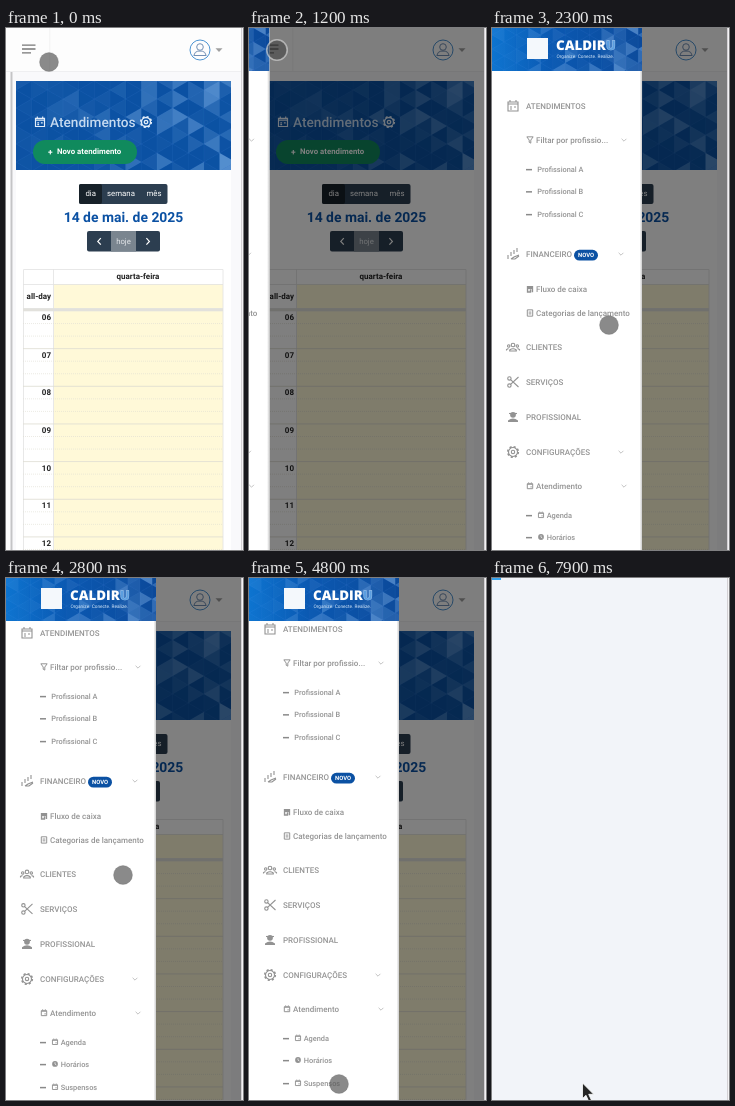
An HTML page that plays this animation: 237 px wide and 522 px high, repeating every 8000 ms.

```html
<!DOCTYPE html>
<html lang="pt-BR">
<head>
<meta charset="utf-8">
<style>
html, body { margin: 0; width: 100%; height: 100%; overflow: hidden; background: #fff; }
svg { display: block; width: 237px; height: 522px; font-family: Roboto, "Liberation Sans", sans-serif; text-rendering: geometricPrecision; }
.icon { fill: none; stroke: #929292; stroke-width: 1.1; }
.icon.white { stroke: #e3eefa; stroke-width: 1.3; }
.icon .solid { fill: #929292; stroke: none; }
#list { font-weight: 500; }
</style>
</head>
<body>
<svg id="stage" viewBox="0 0 237 522"></svg>
<script>
const LOOP = 8000, GRAY = '#949494', BLUE = '#0b51a3', NAVY = '#2c3e50';
const stage = document.getElementById('stage');

const rect = (x, y, w, h, fill, extra = '') =>
  `<rect x="${x}" y="${y}" width="${w}" height="${h}" fill="${fill}" ${extra}/>`;
const text = (x, y, str, size = 8, fill = GRAY, extra = '') =>
  `<text x="${x}" y="${y}" font-size="${size}" fill="${fill}" ${extra}>${str}</text>`;
const path = (d, stroke, width = 1, extra = '') =>
  `<path d="${d}" fill="none" stroke="${stroke}" stroke-width="${width}" ${extra}/>`;
const icon = (x, y, body, scale = 1, kind = '') =>
  `<g class="icon ${kind}" transform="translate(${x} ${y}) scale(${scale})">${body}</g>`;
const MID = 'text-anchor="middle"', END = 'text-anchor="end"', BOLD = 'font-weight="700"';

let seed = 7;
const rnd = () => (seed = (seed * 16807) % 2147483647) / 2147483647;

// Faint upright facets on a staggered grid, denser towards the right
function facets(w, h, cell) {
  let out = '';
  const depth = cell * .87;
  for (let c = 0; c * depth < w; c++)
    for (let r = -1; r * cell < h; r++)
      for (const side of [0, 1]) {
        const x = c * depth, y = (r + ((c + side) % 2) / 2) * cell;
        const alpha = rnd() ** 3 * (.1 + .4 * x / w);
        const d = side ? `M${x} ${y}v${cell}l${depth} ${-cell / 2}z`
                       : `M${x + depth} ${y + cell / 2 * (c % 2 ? -1 : 1) + (c % 2 ? cell / 2 : -cell / 2)}v${cell}l${-depth} ${-cell / 2}z`;
        out += `<path d="${d}" fill="#a5d2ff" fill-opacity="${alpha.toFixed(3)}" stroke="#7db4ee" stroke-opacity=".08" stroke-width=".5"/>`;
      }
  return out;
}

const CAL = '<path d="M-5-4h10v9h-10zM-5-2h10M-3-6v2M3-6v2M-3 1h2M1 1h2M-3 3h2"/>';
const GEAR = '<circle r="4.5"/><circle r="1.7"/><circle r="5.3" stroke-dasharray="2.1 2.06" stroke-width="1.6"/>';
const PEOPLE = '<circle cy="-2" r="1.8"/><circle cx="-4.3" cy="-1" r="1.2"/><circle cx="4.3" cy="-1" r="1.2"/><path d="M-3.3 4v-1q3.3-2.6 6.6 0v1zM-6.5 3.5v-1l2-1M6.5 3.5v-1l-2-1"/>';
const CUT = '<circle cx="-3.6" cy="-3.6" r="1.7"/><circle cx="-3.6" cy="3.6" r="1.7"/><path d="M-2.4-2.4L5.5 5M-2.4 2.4L5.5-5"/>';
const PERSON = '<g class="solid"><circle cy="-2.2" r="2.9"/><path d="M-5 5v-1.6q5-4 10 0v1.6z"/></g><path d="M-4-3.5h8"/>';
const CHART = '<path d="M-5 1v4M-2-2v4M1-4v4M4-6v4M-2 5l3-2 5-2M-2 5h4l4-3"/>';
const FUNNEL = '<path d="M-3.5-3.5h7l-2.6 3.6v3.4l-1.8-1v-2.4z"/>';
const SHOP = '<path d="M-3.5-2.5h7M-3.5-.8h7M-2.7 0v3.3h3.2v-3M2.7 0v3.5" stroke-width="1.6"/>';
const LIST = '<path d="M-3-3.5h6v7h-6zM-1.5-1h3M-1.5 1h3"/>';
const CLOCK = '<circle class="solid" r="3.4"/><path d="M0-2v2.2l1.6 1" stroke="#fff" stroke-width=".8"/>';
const MINI = '<path d="M-3-2.5h6v5.5h-6zM-3-2h6M-1.5-4v1M1.5-4v1M.5 1h1.5"/>';

function page() {
  let s = rect(0, 0, 237, 522, '#fdfdfe') + rect(7, 44, 228, 478, '#f9f9fb') + rect(10, 53, 215, 469, '#fff');
  s += rect(0, 0, 235, 43, '#fdfdfd') + rect(0, 43, 235, 1, '#efeff1') + rect(43.5, 0, .7, 43, '#ededed');
  s += rect(4.5, 44, 2, 478, '#c4c4c6');
  s += path('M16 17.2h13.5M16 21h13.5M16 24.8h9', '#777', 1.3);
  s += `<g fill="none" stroke="#4d94d2"><circle cx="194" cy="22" r="10"/><g stroke="#7390b5"><circle cx="194" cy="19" r="3.3"/><path d="M187.8 27.5q1-4 4-4.4h4.4q3 .4 4 4.4z"/></g></g>`;
  s += '<path d="M209.5 20.3h7l-3.5 3.6z" fill="#a0a0a0"/>';

  s += `<svg x="10" y="53" width="215" height="89">${rect(0, 0, 215, 89, BLUE)}${facets(215, 89, 18)}</svg>`;
  s += icon(34, 94, CAL, .9, 'white') + icon(140, 94, GEAR, 1, 'white');
  s += text(44, 99, 'Atendimentos', 13.65, '#c6daf0', 'font-weight="500"');
  s += rect(27, 112, 104, 24, '#108a5d', 'rx="12"');
  s += text(42, 126.5, '+', 8.5, '#fff', BOLD) + text(51, 126.3, 'Novo atendimento', 7.8, '#fff', BOLD);

  s += rect(73, 156, 88.5, 20, NAVY, 'rx="2"') + rect(73, 156, 23, 20, '#172129', 'rx="2"');
  s += text(84.7, 168.3, 'dia', 7.8, '#fff', MID) + text(115, 168.3, 'semana', 7.8, '#fff', MID) + text(148, 168.3, 'mês', 7.8, '#fff', MID);
  s += text(117.5, 194, '14 de mai. de 2025', 13.9, BLUE, MID + ' font-weight="600"');
  s += rect(81, 203, 73, 20.5, NAVY, 'rx="2"') + rect(105, 203, 25, 20.5, '#7a858f');
  s += text(117.5, 215.7, 'hoje', 7.8, '#e4e7ea', MID) + path('M94.8 210.2l-3 3.2 3 3.2M140.4 210.2l3 3.2-3 3.2', '#fff', 1.2);

  s += rect(48, 256, 169, 266, '#fff9d8');
  s += path('M17.5 522V241.5H217V522M47.5 241V522M17 256.5H217M17 280.5H217', '#e3e3e3', .8);
  s += rect(17, 280.5, 200, 2.8, '#e2e1dc');
  s += text(132, 251, 'quarta-feira', 8, '#222', MID + ' ' + BOLD) + text(45, 271, 'all-day', 8, '#222', END + ' ' + BOLD);
  for (let i = 0; i < 7; i++) {
    const y = 283 + i * 37.65;
    if (i) s += path(`M17 ${y}H217`, '#dedcd2', .8);
    s += path(`M17 ${y + 12.55}H217M17 ${y + 25.1}H217`, '#dedcd2', .6, 'stroke-dasharray="1 1"');
    s += text(45, y + 9, String(i + 6).padStart(2, '0'), 8, '#222', END + ' ' + BOLD);
  }
  return s;
}

function menu() {
  const head = (y, label, body) => icon(21, y, body) + text(34, y + 2.9, label);
  const sub = (y, label, body) => icon(38, y, body, .9) + text(44, y + 2.8, label);
  const leaf = (y, label, body, id = '') => rect(34, y - .1, 6, 1.5, '#8a8a8a') +
    (body ? icon(49, y, body, .85) : '') + text(body ? 54.7 : 45.3, y + 2.6, label, 7.4, GRAY, id);
  const chev = (x, y) => path(`M${x - 2.4} ${y - 1.2}l2.4 2.4 2.4-2.4`, '#bbb', .9);
  return head(78, 'ATENDIMENTOS', CAL) + sub(112, 'Filtar por profissio...', FUNNEL) + chev(132, 112) +
    leaf(141, 'Profissional A') + leaf(163.2, 'Profissional B') + leaf(186, 'Profissional C') +
    head(226, 'FINANCEIRO', CHART) + rect(82, 221.8, 24, 10.8, BLUE, 'rx="5.4"') +
    text(94, 229.4, 'NOVO', 5.9, '#fff', MID + ' ' + BOLD) + chev(129, 226) +
    sub(261, 'Fluxo de caixa', SHOP) + sub(285, 'Categorias de lançamento', LIST) +
    head(319, 'CLIENTES', PEOPLE) + head(354, 'SERVIÇOS', CUT) + head(389, 'PROFISSIONAL', PERSON) +
    head(424, 'CONFIGURAÇÕES', GEAR) + chev(129, 424) + sub(458, 'Atendimento', MINI) + chev(132, 458) +
    leaf(487, 'Agenda', MINI) + leaf(509, 'Horários', CLOCK) + leaf(532, 'Suspensos', MINI, 'id="hover"');
}

function drawer() {
  const brand = rect(0, 0, 150, 43, 'url(#sky)') + facets(150, 43, 14) +
    rect(35, 10, 21, 21, '#f4f8fc') +
    `<text x="64" y="22" font-size="13.4" fill="#fff" font-family="'Open Sans', sans-serif" font-weight="800">CALDIR<tspan fill="#5b9ee0" stroke="#b5d6f5" stroke-width=".4">U</tspan></text>` +
    text(64.5, 29.6, 'Organize. Conecte. Realize.', 4.75, '#dcecfb');
  return rect(0, 0, 150, 522, '#fff') + `<g id="list">${menu()}</g>` +
    `<svg width="150" height="43">${brand}</svg>` + rect(147.5, 43, 2.5, 479, 'url(#edge)');
}

stage.innerHTML = `<defs>
  <linearGradient id="sky"><stop stop-color="#0d74d0"/><stop offset=".4" stop-color="#0b59b2"/><stop offset="1" stop-color="#0b499a"/></linearGradient>
  <linearGradient id="edge"><stop stop-color="#fff"/><stop offset="1" stop-color="#ccc"/></linearGradient></defs>
  ${page()}<rect id="shade" width="235" height="522"/><g id="drawer">${drawer()}</g>
  <g id="blank">${rect(0, 0, 237, 522, '#f2f4f9')}<rect id="bar" height="2" fill="#35a3ee"/></g>
  ${rect(235, 0, 1, 522, '#d3d0d4')}${rect(236, 0, 1, 522, '#f3f2f4')}
  <circle id="dot"/>
  <path id="arrow" d="M90.5 505v15.5l3.5-3.2 2.7 6 2.7-1.2-2.7-5.8h5z" fill="#262626" stroke="#fff" stroke-width=".8"/>`;

const el = id => document.getElementById(id);
const set = (id, attrs) => { for (const k in attrs) el(id).setAttribute(k, attrs[k]); };
const ramp = (t, a, b) => {
  const p = Math.min(1, Math.max(0, (t - a) / (b - a)));
  return (1 - Math.cos(Math.PI * p)) / 2;
};

// Pointer legs: start, end, dx, dy
const legs = [[0, 600, -15, -12], [1600, 2300, 89, 275], [3000, 3500, 3, 188], [3500, 3900, -4, 21], [3900, 4300, -26, 0]];

function draw(t) {
  const slide = ramp(t, 1110, 1483);
  set('shade', { opacity: t < 1200 ? 0 : .5 });
  set('drawer', { transform: `translate(${-150 * (1 - slide)} 0)`, visibility: t < 1200 ? 'hidden' : 'visible' });
  set('list', { transform: `translate(0 ${-27 * ramp(t, 2500, 2900)})` });
  const tone = 148 - 108 * ramp(t, 4900, 5400);
  set('hover', { fill: `rgb(${tone},${tone},${tone})` });

  let x = 43, y = 34;
  for (const [a, b, dx, dy] of legs) { const p = ramp(t, a, b); x += dx * p; y += dy * p; }
  const pressed = t >= 1200 && t < 1700 || t === 4700;
  const arrow = t >= 5000 && t < 5700 || t >= 6300;
  set('dot', {
    cx: x, cy: y, r: pressed ? 10.2 : 9.5, visibility: arrow ? 'hidden' : 'visible',
    fill: pressed ? 'rgba(50,50,50,.45)' : 'rgba(88,88,88,.7)',
    stroke: pressed ? 'rgba(215,215,215,.65)' : 'rgba(80,80,80,.25)', 'stroke-width': pressed ? 1.6 : .8
  });
  set('arrow', { visibility: arrow ? 'visible' : 'hidden' });
  set('blank', { visibility: t >= 7800 ? 'visible' : 'hidden' });
  set('bar', { width: t >= 7900 ? 9 : 0 });
}

const start = performance.now();
function tick() {
  // The picture advances ten times a second
  draw(Math.floor(((performance.now() - start) % LOOP) / 100) * 100);
  requestAnimationFrame(tick);
}
tick();
</script>
</body>
</html>
```
